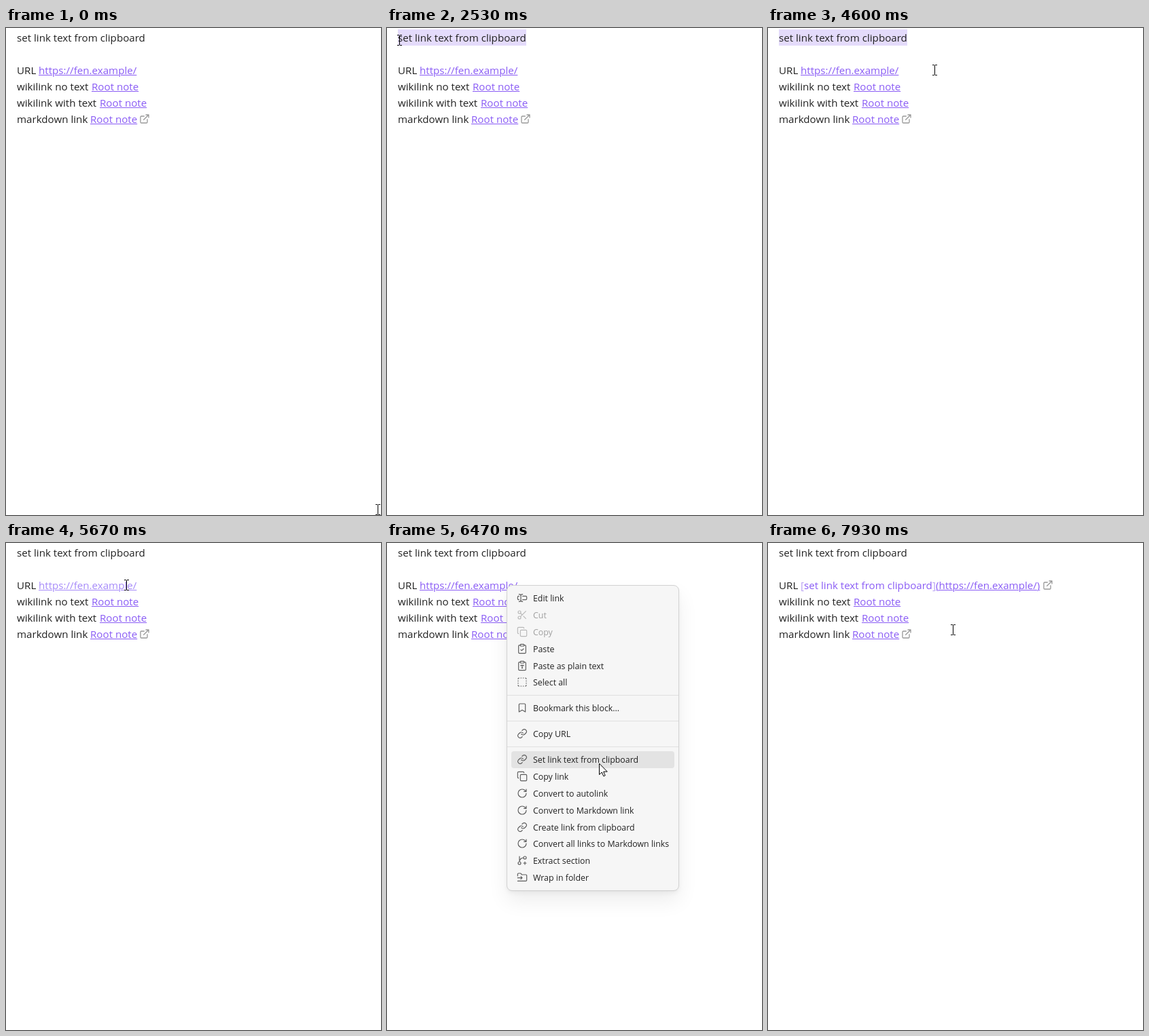
Recreate the animation shown at these times as an HTML page. Size 552x718 px, loop 8000 ms.

```html
<!DOCTYPE html>
<html lang="en">
<head>
<meta charset="utf-8">
<title>Link text from clipboard</title>
<style>
html, body { margin: 0; width: 100%; height: 100%; overflow: hidden; background: #fff; }
#stage { position: relative; width: 552px; height: 718px; overflow: hidden; color: #222;
  font: 15.15px/24px "Open Sans", sans-serif; white-space: pre; cursor: none; }
#stage div, #stage span, #stage svg { position: absolute; }
.link { color: #8a5cf5; text-decoration: underline 1px; text-underline-offset: 1px; }
.plain { color: #8a5cf5; }
.faint { color: #b9a2f3; }
.hover { color: #a68af9; }
svg { fill: none; stroke: #5c5c5c; stroke-width: 1.75; stroke-linecap: round; stroke-linejoin: round; }
svg.out { stroke: #999; stroke-width: 2; }
.menu { box-sizing: border-box; background: #f6f6f6; border: 1px solid #d2d2d2; border-radius: 8px;
  box-shadow: 0 1px 2px #00000007, 0 3.4px 6.7px #0000000b, 0 15px 30px #00000012; }
.row { left: 6px; right: 6px; height: 25px; border-radius: 4px;
  font-size: 12.36px; line-height: 25px; }
.row span { left: 32px; }
.row svg { left: 8px; top: 4px; }
.row.off > * { opacity: .4; }
.row.on { background: #e3e3e3; }
.rule { left: 0; right: 0; height: 1px; background: #e0e0e0; }
#selection { top: 2px; height: 24px; background: #e4dbfb; }
#caret { left: 242px; top: 52px; width: 1px; height: 20px; background: #222; }
#pointer { left: 0; top: 0; overflow: visible; }
</style>
</head>
<body>
<div id="stage"></div>
<script>
const stage = document.getElementById('stage');
const LOOP = 8000, ROW = 24.875, GAP = 13, PAD = 7.05;
const TITLE = 'set link text from clipboard', URL_TEXT = 'https://fen.example/';

const ring = (x, y, r) => `M${x - r} ${y}a${r} ${r} 0 1 0 ${2 * r} 0a${r} ${r} 0 1 0 ${-2 * r} 0`;
const board = 'M9 2h6a1 1 0 0 1 1 1v2a1 1 0 0 1-1 1H9a1 1 0 0 1-1-1V3a1 1 0 0 1 1-1z' +
  'M16 4h2a2 2 0 0 1 2 2v14a2 2 0 0 1-2 2H6a2 2 0 0 1-2-2V6a2 2 0 0 1 2-2h2';
const ICONS = {
  cut: ring(6, 6, 3) + ring(6, 18, 3) + 'M8.1 8.1 12 12M20 4 8.1 15.9M14.8 14.8 20 20',
  copy: 'M10 8h10a2 2 0 0 1 2 2v10a2 2 0 0 1-2 2H10a2 2 0 0 1-2-2V10a2 2 0 0 1 2-2z' +
    'M4 16a2 2 0 0 1-2-2V4a2 2 0 0 1 2-2h10a2 2 0 0 1 2 2',
  paste: board + 'M9 14l2 2 4-4',
  plain: board + 'M9 12v-1h6v1M11 17h2M12 11v6',
  select: 'M3 5a2 2 0 0 1 2-2M19 3a2 2 0 0 1 2 2M21 19a2 2 0 0 1-2 2M5 21a2 2 0 0 1-2-2' +
    'M9 3h1M14 3h1M9 21h1M14 21h1M3 9v1M3 14v1M21 9v1M21 14v1',
  mark: 'm19 21-7-4-7 4V5a2 2 0 0 1 2-2h10a2 2 0 0 1 2 2z',
  branch: ring(18, 6, 3) + ring(6, 18, 3) + 'M6 3v12M15 6a9 9 0 0 0-9 9M18 15v6M21 18h-6',
  search: ring(11, 11, 8) + 'M21 21l-4.3-4.3',
  link: 'M10 13a5 5 0 0 0 7.5.5l3-3a5 5 0 0 0-7-7l-1.8 1.7M14 11a5 5 0 0 0-7.5-.5l-3 3a5 5 0 0 0 7 7l1.8-1.7',
  folder: 'M2 9V5a2 2 0 0 1 2-2h4a2 2 0 0 1 1.6.9l.8 1.2a2 2 0 0 0 1.7.9H20a2 2 0 0 1 2 2v10a2 2 0 0 1-2 2H2' +
    'M2 13h10M9 16l3-3-3-3',
  edit: 'M5 4h1a3 3 0 0 1 3 3 3 3 0 0 1 3-3h1M13 20h-1a3 3 0 0 1-3-3 3 3 0 0 1-3 3H5' +
    'M5 16H4a2 2 0 0 1-2-2v-4a2 2 0 0 1 2-2h1M13 8h7a2 2 0 0 1 2 2v4a2 2 0 0 1-2 2h-7M9 7v10',
  turn: 'M21 12a9 9 0 1 1-9-9c2.5 0 4.9 1 6.7 2.7L21 8M21 3v5h-5',
  out: 'M15 3h6v6M10 14 21 3M18 13v6a2 2 0 0 1-2 2H5a2 2 0 0 1-2-2V8a2 2 0 0 1 2-2h6'
};

function add(parent, tag, cls = '', text = '') {
  const el = document.createElement(tag);
  el.className = cls;
  el.textContent = text;
  parent.append(el);
  return el;
}
function put(parent, x, line, text, cls) {
  const el = add(parent, 'span', cls, text);
  el.style.left = x + 'px';
  el.style.top = 2 + 24 * line + 'px';
  return el;
}
const icon = (name, style = '') =>
  `<svg class="${name}" width="16" height="16" viewBox="0 0 24 24" style="${style}"><path d="${ICONS[name]}"/></svg>`;
const outIcon = (parent, x, y) =>
  parent.insertAdjacentHTML('beforeend', icon('out', `left:${x}px;top:${y}px`));
const show = (el, on) => { el.style.display = on ? '' : 'none'; };

// Items are "icon|label"; a leading "!" disables one, "-" is a separator.
function makeMenu(x, y, width, items) {
  const box = add(stage, 'div', 'menu'), rows = [];
  let top = PAD;
  // Children sit inside the 1px border and snap to whole pixels.
  const place = (el, at) => { el.style.top = Math.round(at) - 1 + 'px'; };
  for (const item of items) {
    if (item === '-') {
      place(add(box, 'div', 'rule'), top + 6);
      top += GAP;
      continue;
    }
    const off = item[0] === '!', [name, label] = item.slice(off).split('|');
    const el = add(box, 'div', off ? 'row off' : 'row');
    el.innerHTML = icon(name);
    add(el, 'span', '', label);
    place(el, top);
    rows.push({ el, off, top: y + top });
    top += ROW;
  }
  Object.assign(box.style,
    { left: x + 'px', top: y + 'px', width: width + 'px', height: Math.round(top + PAD) + 'px' });
  return { box, rows, x };
}

const selection = add(stage, 'div');
selection.id = 'selection';
put(stage, 16, 0, TITLE);
put(stage, 16, 2, 'URL');
['wikilink no text', 'wikilink with text', 'markdown link'].forEach((text, i) => {
  put(stage, 16, 3 + i, text);
  put(stage, [126, 138, 124][i], 3 + i, 'Root note', 'link');
});
outIcon(stage, 195.5, 126);

const bareLink = put(stage, 48, 2, URL_TEXT, 'link');
const fullLink = add(stage, 'div');
put(fullLink, 48, 2, '[', 'faint');
put(fullLink, 53, 2, TITLE, 'plain');
put(fullLink, 242, 2, ']', 'faint');
put(fullLink, 247, 2, `(${URL_TEXT})`, 'link');
outIcon(fullLink, 403.5, 54);
const caret = add(stage, 'div');
caret.id = 'caret';

const menus = [
  makeMenu(30, 20, 280, ['cut|Cut', 'copy|Copy', 'paste|Paste', 'plain|Paste as plain text', 'select|Select all', '-',
    'mark|Bookmark this block...', 'branch|Extract current selection...', '-',
    `search|Search for "${TITLE}"`, '-',
    'link|Create link', 'link|Create link from clipboard', 'branch|Extract section', 'folder|Wrap in folder']),
  makeMenu(176, 62, 254, ['edit|Edit link', '!cut|Cut', '!copy|Copy', 'paste|Paste', 'plain|Paste as plain text',
    'select|Select all', '-', 'mark|Bookmark this block...', '-', 'link|Copy URL', '-',
    'link|Set link text from clipboard', 'copy|Copy link', 'turn|Convert to autolink',
    'turn|Convert to Markdown link', 'link|Create link from clipboard',
    'turn|Convert all links to Markdown links', 'branch|Extract section', 'folder|Wrap in folder'])
];

stage.insertAdjacentHTML('beforeend', `<svg id="pointer" width="1" height="1">
  <path id="beam" d="M-3-7.5h3M1-7.5h3M-3 7.5h3M1 7.5h3M.5-7v14" stroke="#000" stroke-width="1" stroke-linecap="butt"/>
  <path id="arrow" d="M-.5.5v16l3.8-3.5 2.5 5.8 2.4-1-2.5-5.7h5.2z" fill="#fff" stroke="#000" stroke-width="1"/>
</svg>`);
const [pointer, beam, arrow] = ['pointer', 'beam', 'arrow'].map(id => document.getElementById(id));

// Pointer stops: time, x, y
const PATH = [
  [0, 547, 710], [600, 194, 150], [867, 222, 98], [1333, 217, 30], [1600, 211, 21], [1733, 211, 21],
  [2533, 18, 18], [2800, 18, 18], [3000, 30, 20], [3200, 30, 20], [3867, 53, 62], [4000, 53, 62],
  [4800, 281, 62], [4867, 281, 62], [5400, 176, 62], [5600, 176, 62], [5667, 177, 62], [5933, 177, 62],
  [6467, 313, 325], [6800, 322, 338], [6933, 326, 322], [7667, 326, 322], [7933, 272, 128], [LOOP, 272, 128]
];
function pointerAt(t) {
  const i = PATH.findIndex(p => p[0] > t), [t0, x0, y0] = PATH[i - 1], [t1, x1, y1] = PATH[i];
  const u = (t - t0) / (t1 - t0), k = u * u * (3 - 2 * u);
  return [Math.round(x0 + (x1 - x0) * k), Math.round(y0 + (y1 - y0) * k)];
}

const pen = document.createElement('canvas').getContext('2d');
function snapToLetter(x) {
  pen.font = '15.15px "Open Sans", sans-serif';
  let best = 16;
  for (let n = 0; n <= TITLE.length; n++) {
    const edge = 16 + pen.measureText(TITLE.slice(0, n)).width;
    if (Math.abs(edge - x) < Math.abs(best - x)) best = edge;
  }
  return best;
}

function draw() {
  // Motion advances in 15 steps a second.
  const t = Math.floor((performance.now() % LOOP + 5) * .015) / .015 % LOOP + .01;
  const within = (a, b) => t >= a && t < b;
  const [x, y] = pointerAt(t);
  const open = [within(3266, 4066), within(5800, 7400)];

  menus.forEach((menu, i) => {
    show(menu.box, open[i]);
    for (const row of menu.rows)
      row.el.classList.toggle('on', !row.off && x > menu.x + 6 && y >= row.top && y < row.top + ROW);
  });

  show(selection, within(1800, 4800));
  const left = t < 2533 ? snapToLetter(x) : 16;
  selection.style.left = left + 'px';
  selection.style.width = Math.max(0, 205 - left) + 'px';

  const replaced = t >= 7400;
  show(bareLink, !replaced);
  show(fullLink, replaced);
  show(caret, within(7400, 7866));
  bareLink.classList.toggle('hover', x >= 48 && x < 193 && y > 52 && y < 73);

  pointer.style.transform = `translate(${x}px, ${y}px)`;
  show(arrow, open[0] || open[1]);
  show(beam, !open[0] && !open[1]);
  requestAnimationFrame(draw);
}
draw();
</script>
</body>
</html>
```
